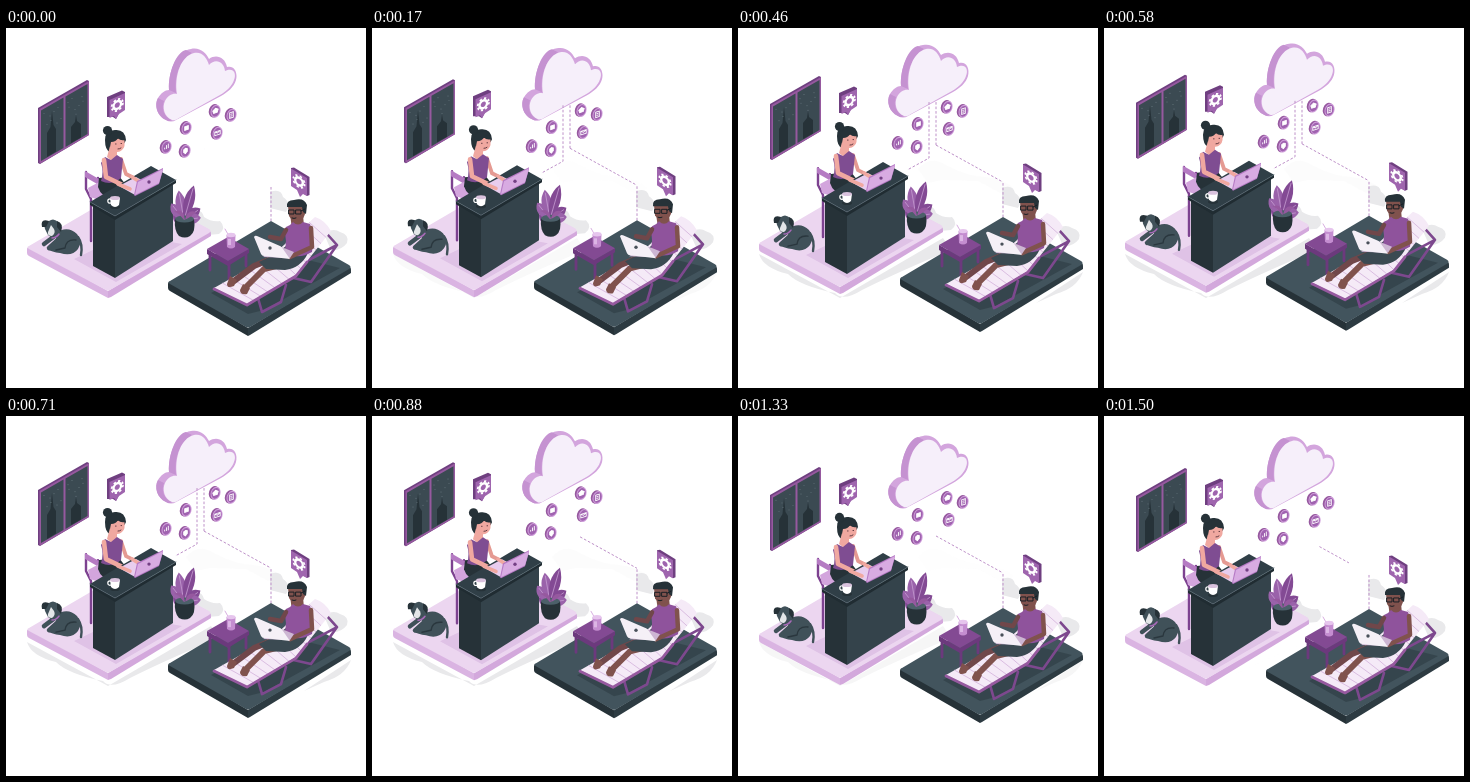
These frames come from a looping animation (360 px wide and 360 px high, 1540 ms). An HTML page:

```html
<!DOCTYPE html>
<html lang="en">
<head>
<meta charset="utf-8">
<title>Working from anywhere</title>
<style>
html, body { margin: 0; width: 100%; height: 100%; overflow: hidden; background: #fff; }
svg { display: block; width: 100%; height: 100%; }
.ink { fill: #263238; } .slate { fill: #3b4a52; } .plum { fill: #96599f; } .deep { fill: #6f3f80; }
.lilac { fill: #d3a5dd; } .pale { fill: #f6effa; } .rose { fill: #f0a8a0; } .brown { fill: #80524d; }
.line { fill: none; stroke-linecap: round; stroke-linejoin: round; }
.dash { fill: none; stroke: #bd90c8; stroke-width: 1; stroke-dasharray: 2.6 1.9; }
</style>
</head>
<body>
<svg viewBox="0 0 360 360">
  <defs>
    <g id="gear">
      <circle r="3.8" fill="none" stroke="#fff" stroke-width="2.4"/>
      <circle r="5.6" fill="none" stroke="#fff" stroke-width="1.900" stroke-dasharray="2.2 2.2"/>
    </g>
    <g id="badge" transform="rotate(18)">
      <ellipse cx="-.9" rx="5.2" ry="6.900" class="plum"/>
      <ellipse cx=".6" rx="4.900" ry="6.600" fill="#cf9dda"/>
      <ellipse cx=".6" rx="3.900" ry="5.500" fill="#a063b0"/>
    </g>
  </defs>

  <g id="shadow" fill="#e9e9eb">
    <path d="M21 226L102 270L205 210L213 222Q160 244 124 262Q105 274 97 265Q62 258 50 246Q25 240 21 226Z"/>
    <path d="M298 275L345 244Q339 260 318 266Z"/>
    <path d="M180 141Q192 127 208 137Q228 148 247 149Q267 151 276 161L262 165L240 153L204 152L190 155Z" opacity=".15"/>
  </g>

  <g id="scene">
    <g fill="#e9e9eb">
      <path d="M187 185Q195 179 198 189Q205 194 214 193Q221 200 213 206L190 208Z"/>
      <path d="M264 164Q275 160 277 169Q286 175 280 184L264 180Z"/>
      <path d="M318 206Q327 199 334 204Q344 207 341 215Q335 223 325 222Z"/>
    </g>

    <!-- window -->
    <path class="deep" d="M32 80L81 52L83 53V107L34 136L32 135Z"/>
    <path class="plum" d="M33.500 81L83 53V107L33.500 136Z"/>
    <path class="slate" d="M35 82.500L57.500 69.500V120L35 133ZM59.500 68.500L81.500 56V106L59.500 119Z"/>
    <path class="ink" d="M46 83L47.500 97L50 101V123.500L41 129V105L44.500 99ZM70 87L71 93L75 96V109.500L65 115V99L69 94Z"/>
    <g id="stars" fill="#87979e"></g>

    <!-- speech signs -->
    <path class="deep" d="M101 69L116 62.500L119 64V81L113 85L110 91L107 89L101 89Z"/>
    <path fill="#9f65ae" d="M103.500 72L119 65V82L113 86L110 91L108 88L103.500 90Z"/>
    <use href="#gear" transform="translate(111.300 77) skewY(-20)"/>
    <path class="deep" d="M285 140L288 139.500L303.500 149V167L301 168L285 157Z"/>
    <path fill="#9f65ae" d="M285 140.500L301 150V168L297 166L294 169L291 162L285 158Z"/>
    <use href="#gear" transform="translate(293 153.500) skewY(24)"/>

    <!-- cloud -->
    <path class="lilac" d="M160 92C151 88 148 77 152 70C155 65 159 62 163 62C162 45 170 23 185 21C194 19 200 25 203 31C210 26 219 29 221 39C228 37 232 44 230 52C228 59 222 64 215 68L170 92Q165 95 160 92Z"/>
    <path fill="#c592d1" d="M160 92C151 88 148 77 152 70L158 73C155 81 158 89 166 92Q163 94 160 92ZM163 62C162 45 170 24 180 22L186 25C173 33 168 48 170 65Z"/>
    <path class="pale" d="M166 92C158 89 156 79 159 73C162 67 167 65 171 66C168 48 175 28 188 25C196 23 201 30 203 37C209 30 218 33 219 43C227 39 231 45 228 52C226 58 221 63 214 67L173 90Q169 93 166 92Z"/>

    <!-- connections -->
    <g id="links">
      <path class="dash" d="M191 78V134L169 146"/>
      <path class="dash" d="M198 78V121"/>
    </g>
    <path id="slope" class="dash"/>
    <path class="dash" d="M265 159V211"/>

    <g id="badges"></g>

    <!-- home floor -->
    <path fill="#dab4e2" d="M21 221Q21 219 24 219L102 263V270L23 228Q21 227 21 225Z"/>
    <path fill="#d3a8dc" d="M102 263L203 203Q205 203 205 206V208L105 269L102 270Z"/>
    <path fill="#ecd6f0" d="M23 218L124 159L203 201Q206 203 203 205L104 262Q102 263 100 262L23 221Q20 219 23 218Z"/>
    <path fill="#dfc2e6" d="M68 231L87 222L109 249L165 214L176 216L110 254Z"/>

    <!-- dog -->
    <g class="line" stroke="#405159">
      <path d="M72 209Q77 216 75 227" stroke-width="2.400"/>
      <path d="M50 207L38 216M54 210L43 220" stroke-width="4.500"/>
    </g>
    <path fill="#405159" d="M49 205Q62 197 71 206Q77 214 72 221Q66 229 54 225Q46 224 41 221L51 215Z"/>
    <path class="line" d="M70 212Q60 211 59 220L50 222" stroke="#2a373e" stroke-width="1.400"/>
    <path fill="#405159" d="M39 201Q37 193 43 193Q48 189 53 195Q56 202 52 207Q48 212 42 207Z"/>
    <path class="ink" d="M43 193Q34 190 36 199L40 199ZM51 193Q58 195 55 204L51 199Z"/>
    <path fill="#e3e6e8" d="M45 197L48 201Q50 205 46 208Q41 208 42 204Z"/>
    <path class="line" d="M46 210Q50 210 53 206" stroke="#a86ab8" stroke-width="1.500"/>

    <!-- chair and woman -->
    <path class="line" d="M80 144V161L85 171V213M92 150V168" stroke="#7d4290" stroke-width="2.400"/>
    <path fill="#b57bc3" d="M79 143L93 151V157L79 149Z"/>
    <path class="lilac" d="M82 160L95 153L116 164L99 174L84 169Z"/>
    <path class="ink" d="M93 150L113 148L124 162L107 171Q95 169 92 159Z"/>
    <path class="line" d="M115 131L120 146L134 153" stroke="#e59a92" stroke-width="3.800"/>
    <path class="ink" d="M99 112Q99 102 109 102Q119 101 120 112Q117 119 114 115L104 124Q99 122 99 112Z"/>
    <circle class="ink" cx="101.500" cy="102.500" r="4.600"/>
    <path class="rose" d="M104 118L111 121V130L106 133L101 129Z"/>
    <path fill="#7f4d92" d="M99 129L105 132L111 127L117 131L115 150Q106 158 95 153Q98 144 95 135Z"/>
    <path class="line" d="M98 132L100 149L123 160" stroke="#f0a8a0" stroke-width="4.600"/>
    <path class="rose" d="M103 112L118 110Q120 119 116 122Q112 126 106 122Q103 119 103 112Z"/>
    <path class="ink" d="M102 117Q101 105 111 104Q119 104 119 112Q114 113 112 110Q110 114 105 114L104 119Z"/>
    <path class="line" d="M109.500 116h.6M115 115.500h.6M112 121Q114 121 115 120" stroke="#633b42" stroke-width="1"/>

    <!-- desk -->
    <path class="ink" d="M87 177L109 190V250L87 238Z"/>
    <path fill="#34434b" d="M109 190L167 156V213L109 250Z"/>
    <path fill="#202c32" d="M84 174L109 188L170 152V155L109 192L84 177Z"/>
    <path fill="#303f47" d="M84 174L145 138L170 152L109 188Z"/>
    <path class="line" d="M84 174L109 188L170 152" stroke="#52656e" stroke-width=".7"/>
    <path fill="#e8cdee" d="M113 158L130 149L145 157L129 167Z"/>
    <path class="line" d="M112 156L124 161M126 149L134 154" stroke="#f0a8a0" stroke-width="3.600"/>
    <path fill="#b67ac5" d="M128 167L131 153L157 140V142L153 156L129 168Z"/>
    <path fill="#d8abe2" d="M129 167L132 154L157 141L153 155Z"/>
    <circle cx="143" cy="154" r="1.700" fill="#744085"/>
    <ellipse cx="109" cy="179" rx="5" ry="2" class="ink"/>
    <circle cx="104" cy="173" r="2.200" fill="none" stroke="#fff" stroke-width="1.200"/>
    <path fill="#fff" d="M104 170H114L113 177Q109 181 105 177Z"/>
    <ellipse cx="109" cy="170" rx="5" ry="2" fill="#d9c2dd"/>

    <!-- plant -->
    <g id="leaves"></g>
    <path class="ink" d="M169 191H188Q190 204 184 208Q179 211 173 208Q168 203 169 191Z"/>
    <ellipse cx="178.500" cy="191" rx="9.500" ry="3.500" fill="#4c606a"/>
    <path class="plum" d="M178 192Q171 183 168 184Q177 179 179 192Q181 181 190 184Q184 190 178 192Z"/>

    <!-- terrace floor -->
    <path fill="#263238" d="M162 256Q162 253 165 254L242 300V308L164 263Q162 262 162 260Z"/>
    <path fill="#2d3b42" d="M242 300L343 239Q345 239 345 242V245L244 307L242 308Z"/>
    <path fill="#42545d" d="M164 253L265 193L343 237Q346 239 343 241L244 299Q242 300 240 299L164 256Q161 254 164 253Z"/>
    <path fill="#35454d" d="M205 265L278 226L334 240L258 282L242 286Z"/>

    <!-- side table -->
    <path class="line" d="M204 224V242M223 235V252M240 224V238" stroke="#6c397d" stroke-width="2.800"/>
    <path fill="#6c397d" d="M201 221L222 233L243 221V225L222 238L201 226Z"/>
    <path fill="#834a93" d="M201 221L222 209L243 221L222 233Z"/>
    <path class="line" d="M223 208L219 201" stroke="#d8afe1" stroke-width="1"/>
    <path fill="#c48dd0" d="M220.500 207H229.500L229 219Q225 222 221 219Z"/>
    <ellipse cx="225" cy="207" rx="4.500" ry="2.200" fill="#e6c5ed"/>
    <path fill="#dcb5e5" d="M222 211h3v6h-3Z"/>

    <!-- lounger -->
    <path class="line" d="M252 270L256 284L275 274L280 257M283 249L305 254L331 217L322 207M299 234L331 217" stroke="#7d488e" stroke-width="2.600"/>
    <path fill="#f5eaf7" d="M208 260L268 226L309 189Q319 192 325 203L290 247L241 277Z"/>
    <g id="slats" stroke="#dabde1" stroke-width="1"></g>
    <path class="line" d="M208 261L241 277L290 248L301 234" stroke="#96599f" stroke-width="2.800"/>

    <!-- man -->
    <path class="line" d="M270 229L248 238L228 253" stroke="#70474a" stroke-width="6"/>
    <path class="line" d="M278 236L258 241L240 259" stroke="#80524d" stroke-width="6"/>
    <path class="brown" d="M224 248L231 252L228 258Q221 261 221 256ZM237 256L244 260L241 266Q234 267 234 262Z"/>
    <path class="slate" d="M280 218L302 225Q295 240 279 242L260 241L253 234L270 226Z"/>
    <path class="brown" d="M284 186L297 187L298 198L286 201Z"/>
    <path fill="#8f539c" d="M280 199Q285 197 287 194Q292 199 297 194L304 196Q309 207 306 224Q293 232 278 225Q282 212 278 204Z"/>
    <path class="line" d="M280 202L275 211L264 209" stroke="#70474a" stroke-width="4.500"/>
    <path class="line" d="M305 200L306 219L284 229" stroke="#80524d" stroke-width="4.500"/>
    <path class="brown" d="M282 178L299 177Q301 188 295 192Q287 195 283 188Z"/>
    <path class="ink" d="M281 179Q280 172 288 172Q298 169 301 177L300 186L297 184L296 179Z"/>
    <path class="line" d="M283 182h5v4h-5ZM290 182h5v4h-5ZM295 183L299 181M286 190Q288 191 290 190" stroke="#191f25" stroke-width="1"/>
    <path fill="#cdb6d3" d="M257 229L284 230L288 224L273 218Z"/>
    <path fill="#f5f0f7" d="M248 209Q249 207 251 208L274 218Q276 219 277 221L284 231L258 228Q256 228 255 226Z"/>
    <circle cx="264" cy="220" r="1.700" fill="#49505a"/>
  </g>
</svg>
<script>
const LOOP = 1540, LIFT = 6;
const $ = id => document.getElementById(id);
const fill = (id, items, draw) => { $(id).innerHTML = items.map(draw).join(''); };
const range = n => Array.from({ length: n }, (_, i) => i);

fill('stars', range(16), i => {
  const x = (i < 8 ? 38 : 61) + i * 7 % 18, y = 103 - x * .57 + i * 11 % 20;
  return `<circle cx="${x}" cy="${y + 4}" r=".45"/>`;
});

const glyphs = ['M-2-2h4v4h-4Z', 'M-3-1L0-3L3-1L2 2H-2Z', 'M-2-3H2V3H-2ZM-1-1H1M-1 1H1',
  'M-3-2H3V2H-3ZL0 0L3-2', 'M-2 2V0M0 2V-2M2 2V-3', 'M0-3L2-2V1L0 3L-2 1V-2Z'];
fill('badges', [[180, 100], [209, 83], [225, 87], [211, 105], [160, 119], [179, 123]], ([x, y], i) =>
  `<g transform="translate(${x} ${y})"><use href="#badge"/>
   <path d="${glyphs[i]}" transform="translate(.5) skewY(-18) scale(.9)"
     fill="${i < 2 || i === 5 ? '#fff' : 'none'}" stroke="#fff" stroke-width="1"/></g>`);

// [angle, length] of each leaf
fill('leaves', [[-68, 12], [-38, 21], [55, 20], [-10, 30], [16, 36], [82, 17]], ([angle, size], i) =>
  `<g transform="translate(178 192) rotate(${angle})">
   <path fill="${i % 2 ? '#9a62aa' : '#834a94'}" d="M0 0Q-11 ${-size * .6} 0 ${-size}Q10 ${-size * .55} 0 0Z"/>
   <path d="M0 0V${-size + 3}" stroke="#c9a0d4" stroke-width=".7"/></g>`);

const slat = (x1, y1, x2, y2) => `<path d="M${x1} ${y1}L${x2} ${y2}"/>`;
fill('slats', range(14), i => {
  const u = i % 7 / 7;
  return i < 7
    ? slat(208 + 60 * u, 260 - 34 * u, 241 + 49 * u, 277 - 30 * u)
    : slat(268 + 41 * u, 226 - 37 * u, 290 + 35 * u, 247 - 44 * u);
});

// [start time, from, to]: visible share of the sloping connection
const spans = [[0, 0, 0], [160, 0, 1], [740, .15, 1], [1000, .15, .62], [1210, 0, 1], [1420, .26, .7]];

function render(now) {
  const t = now % LOOP;
  const rise = (1 - Math.cos(t / LOOP * 2 * Math.PI)) / 2;
  $('scene').setAttribute('transform', `translate(0 ${-LIFT * rise})`);
  $('shadow').setAttribute('opacity', Math.min(1, rise * 2.5));
  const [, from, to] = spans.filter(s => s[0] <= t).pop();
  const point = u => `${198 + 67 * u} ${121 + 37 * u}`;
  $('slope').setAttribute('d', `M${point(from)}L${point(to)}`);
  $('links').setAttribute('visibility', t >= 160 && t < 740 ? 'visible' : 'hidden');
  requestAnimationFrame(() => render(performance.now() - start));
}
const start = performance.now();
render(0);
</script>
</body>
</html>
```
